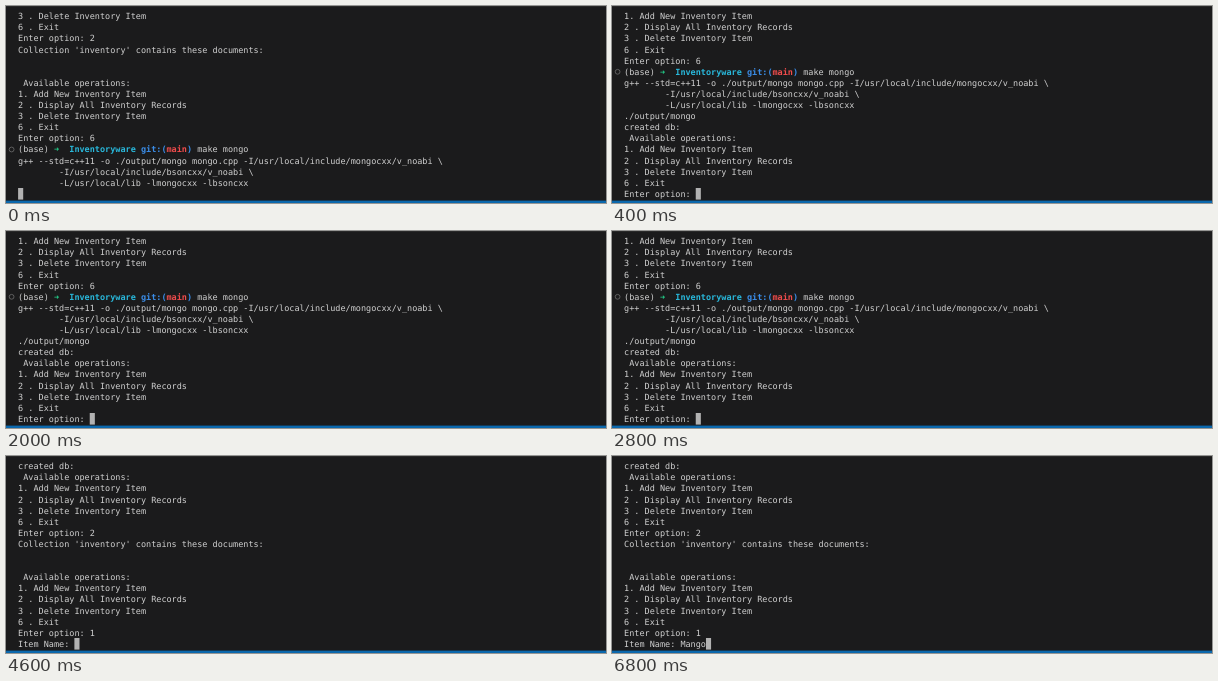
Animation, 600 px wide and 197 px high, one loop 8 s. Source, as an HTML page:

```html
<!DOCTYPE html>
<html lang="en">
<head>
<meta charset="utf-8">
<title>Terminal</title>
<style>
  html, body { margin: 0; width: 100%; height: 100%; overflow: hidden; background: #1b1b1c; }
  svg { display: block; }
  text {
    font: 8.5px "DejaVu Sans Mono", "Liberation Mono", monospace;
    fill: #d0d0d0;
    white-space: pre;
    text-rendering: geometricPrecision;
  }
  .bold { font-weight: bold; }
</style>
</head>
<body>
<svg id="stage" width="600" height="197" viewBox="0 0 600 197">
  <rect width="600" height="197" fill="#1b1b1c"/>
  <rect width="600" height="1" fill="#292929"/>
  <rect y="194.6" width="600" height="2.4" fill="#0b68ad"/>
  <g id="rows"></g>
  <rect id="cursor" y="182" width="5.1" height="11.6" fill="#b2b2b2"/>
</svg>
<script>
const LOOP = 8000, ROWS = 17;
const LEFT = 12.1, COL = 5.117, BASE = 13.2, LINE = 11.1;
const PROMPT = Symbol("prompt");

const operations = [
  " Available operations:",
  "1. Add New Inventory Item",
  "2 . Display All Inventory Records",
  "3 . Delete Inventory Item",
  "6 . Exit"
];
const listing = ["Enter option: 2", "Collection 'inventory' contains these documents:", "", ""];

const log = [
  ...operations.slice(3),
  ...listing,
  ...operations,
  "Enter option: 6",
  PROMPT,
  "g++ --std=c++11 -o ./output/mongo mongo.cpp -I/usr/local/include/mongocxx/v_noabi \\",
  "        -I/usr/local/include/bsoncxx/v_noabi \\",
  "        -L/usr/local/lib -lmongocxx -lbsoncxx",
  "./output/mongo",
  "created db:",
  ...operations,
  ...listing,
  ...operations,
  "Enter option: 1"
];

// Column, text, colour (coloured parts are bold)
const promptParts = [
  [0, "(base)"],
  [7, "➜", "#23d18b"],
  [10, "Inventoryware", "#29b8db"],
  [24, "git:(", "#3b8eea"],
  [29, "main", "#f14c4c"],
  [33, ")", "#3b8eea"],
  [35, "make mongo"]
];

// Start time, finished lines, text on the live line
const steps = [
  [0, 16, ""],
  [200, 17, ""],
  [400, 23, "Enter option: "],
  [3000, 32, "Enter option: "],
  [4600, 33, "Item Name: "]
];
const typed = "Mango", typeStart = 6000, typeGap = 200;

const rows = document.getElementById("rows");
const cursor = document.getElementById("cursor");

function add(name, attrs, text = "") {
  const node = document.createElementNS("http://www.w3.org/2000/svg", name);
  for (const key in attrs) node.setAttribute(key, attrs[key]);
  node.textContent = text;
  rows.append(node);
}

function drawText(col, y, text, color) {
  const attrs = { x: LEFT + col * COL, y };
  if (color) Object.assign(attrs, { class: "bold", style: `fill:${color}` });
  add("text", attrs, text);
}

function drawLine(line, row) {
  const y = BASE + row * LINE;
  if (line === PROMPT) {
    add("circle", { cx: 5.6, cy: y - 2.9, r: 2.4, fill: "none", stroke: "#6e6e6e", "stroke-width": 0.8 });
    for (const [col, text, color] of promptParts) drawText(col, y, text, color);
  } else if (line) {
    drawText(0, y, line);
  }
}

let shown = "";
function render(time) {
  const [, done, start] = steps.filter(step => step[0] <= time).pop();
  const count = Math.max(0, Math.floor((time - typeStart) / typeGap) + 1);
  const live = start + typed.slice(0, count);
  const key = done + live;
  if (key === shown) return;
  shown = key;
  rows.replaceChildren();
  [...log.slice(done - ROWS + 1, done), live].forEach(drawLine);
  cursor.setAttribute("x", LEFT + live.length * COL);
}

const begin = performance.now();
function tick() {
  render((performance.now() - begin) % LOOP);
  requestAnimationFrame(tick);
}
tick();
</script>
</body>
</html>
```
